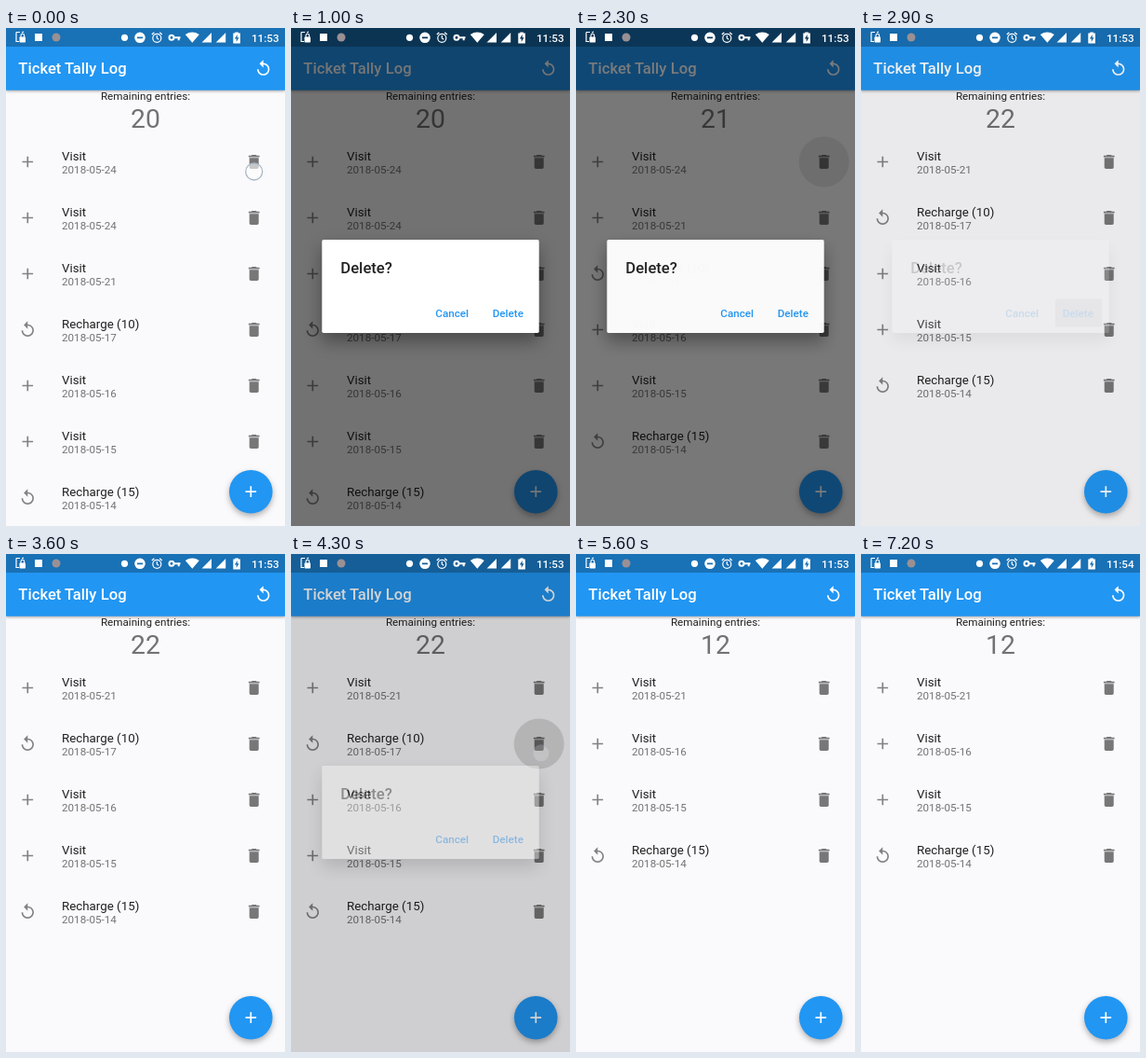
Write an HTML page that moves like this. It is 300 by 534 pixels and loops after 7.7 s.

```html
<!DOCTYPE html>
<html lang="en">
<head>
<meta charset="utf-8">
<title>Ticket Tally Log</title>
<style>
  html, body { margin: 0; width: 100%; height: 100%; overflow: hidden; background: #faf9fb; }
  svg { display: block; width: 300px; height: 534px; font-family: Roboto, sans-serif; }
  .bar { filter: drop-shadow(0 1.5px 1.8px rgba(0,0,0,.35)); }
  .fab { filter: drop-shadow(0 3px 3px rgba(0,0,0,.3)); }
  .card { filter: drop-shadow(0 9px 9px rgba(0,0,0,.35)); }
  .title { font-size: 16.67px; font-weight: 500; }
  .item { font-size: 13.33px; fill: rgba(0,0,0,.87); }
  .small { font-size: 11.67px; }
  .grey { fill: rgba(0,0,0,.54); }
  .button { font-size: 11.67px; font-weight: 500; fill: #2196f3; }
</style>
</head>
<body>
<svg viewBox="0 0 300 534">
  <defs>
    <path id="add" d="M19 13h-6v6h-2v-6H5v-2h6V5h2v6h6v2z"/>
    <path id="replay" d="M12 5V1L7 6l5 5V7c3.31 0 6 2.69 6 6s-2.69 6-6 6-6-2.69-6-6H4c0 4.42 3.58 8 8 8s8-3.58 8-8-3.58-8-8-8z"/>
    <path id="trash" d="M6 19c0 1.1.9 2 2 2h8c1.1 0 2-.9 2-2V7H6v12zM19 4h-3.5l-1-1h-5l-1 1H5v2h14V4z"/>
  </defs>

  <rect width="300" height="534" fill="#faf9fb"/>
  <text x="150" y="77.3" text-anchor="middle" class="small" fill="rgba(0,0,0,.87)">Remaining entries:</text>
  <text id="count" x="150" y="107" text-anchor="middle" font-size="28.33" class="grey"></text>
  <g id="list"></g>
  <circle id="ripple" cx="266.7" fill="#000"/>

  <rect class="bar" y="-5" width="300" height="71.7" fill="#2196f3"/>
  <rect width="300" height="20" fill="#1971b6"/>
  <text x="13.3" y="49.3" class="title" fill="#fff">Ticket Tally Log</text>
  <use href="#replay" transform="translate(266.7 33.3) scale(.8333)" fill="#fff"/>
  <circle class="fab" cx="263.3" cy="497.2" r="23.3" fill="#2196f3"/>
  <use href="#add" transform="translate(253.3 487.2) scale(.8333)" fill="#fff"/>

  <rect id="shade" width="300" height="534"/>
  <g id="dialog">
    <rect class="card" x="33.3" y="227" width="233.4" height="100" rx="1.7" fill="#fff"/>
    <rect id="press" x="209" y="290.5" width="50" height="30" rx="1.7" fill="#999"/>
    <text x="53.3" y="263.2" class="title" fill="rgba(0,0,0,.87)">Delete?</text>
    <text x="155.3" y="309.6" class="button">Cancel</text>
    <text x="216.7" y="309.6" class="button">Delete</text>
  </g>

  <!-- status icons -->
  <g fill="#fff">
    <path d="M11 4.5h4M11 4.5v10h3M17 5l2-1" fill="none" stroke="#fff" stroke-width="1.2"/>
    <rect x="14.5" y="9.5" width="6.5" height="6" rx=".8"/>
    <path d="M16 10V8a1.8 1.8 0 0 1 3.6 0v2" fill="none" stroke="#fff" stroke-width="1.1"/>
    <rect x="31" y="6" width="8" height="8"/>
    <circle cx="54" cy="10" r="4.5" fill="#9a9094"/>
    <circle cx="127.5" cy="10.3" r="3.6"/>
    <path fill-rule="evenodd" d="M138.2 10.3a5.8 5.8 0 1 0 11.6 0a5.8 5.8 0 1 0-11.6 0zM141 9.5h6v1.7h-6z"/>
    <g fill="none" stroke="#fff" stroke-width="1.2">
      <circle cx="162.3" cy="10.8" r="4.5"/>
      <path d="M162.3 8v3l2 1.3M156.8 7l2.6-2.2M167.8 7l-2.6-2.2"/>
      <circle cx="178" cy="10.3" r="2.5" stroke-width="2"/>
      <path d="M180.5 10.3h7M185.7 10.3v3" stroke-width="2"/>
    </g>
    <path d="M200.3 15.8L192.8 6.9Q200.3 2.1 207.8 6.9zM210.5 15.5h10.5V5zM225.7 15.5h10.5V5z"/>
    <path fill-rule="evenodd" d="M244.3 5.6h2V4.4h3.6v1.2h2v10.8h-7.6zM248.7 7l-2.8 4.6h1.8V15l2.8-4.7h-1.8z"/>
    <text id="clock" x="293.6" y="14.6" text-anchor="end" class="small" font-weight="500"></text>
  </g>

  <circle id="touch" r="9" fill="rgba(255,255,255,.6)" stroke="#a9b9c6" stroke-width="1.3"/>
</svg>

<script>
const LOOP = 7700;
const get = id => document.getElementById(id);
const set = (id, attrs) => {
  for (const key in attrs) get(id).setAttribute(key, attrs[key]);
};

// days in May, with the recharge amount and the index of the tap that deletes the entry
const entries = [
  { day: 24, gone: 0 },
  { day: 24, gone: 1 },
  { day: 21 },
  { day: 17, charge: 10, gone: 2 },
  { day: 16 },
  { day: 15 },
  { day: 14, charge: 15 }
];
const taps = [
  { open: 0, close: 1000, x: 266.7, y: 154, row: 0 },
  { open: 2000, close: 2600, x: 271, y: 152, row: 0 },
  { open: 4100, close: 4800, x: 269, y: 214, row: 1 }
];
const counts = [20, 21, 22, 12];
const FADE = 155, OPEN_LAG = 152, CLOSE_LAG = 164;

const icon = (name, x, alpha) =>
  `<use href="#${name}" transform="translate(${x - 10} 133.5) scale(.8333)" fill-opacity="${alpha}"/>`;

get("list").innerHTML = entries.map(({ day, charge }) => `<g>
  ${icon(charge ? "replay" : "add", 23.3, .48)}
  <text x="60" y="141.6" class="item">${charge ? `Recharge (${charge})` : "Visit"}</text>
  <text x="60" y="156" class="small grey">2018-05-${day}</text>
  ${icon("trash", 266.7, .52)}</g>`).join("");
const rows = [...get("list").children];

const ramp = (t, start, length) => Math.min(1, Math.max(0, (t - start) / length));

function draw(t) {
  const deleted = taps.filter(tap => t >= tap.close + CLOSE_LAG).length;
  let line = 0;
  entries.forEach(({ gone }, i) => {
    const shown = gone === undefined || gone >= deleted;
    rows[i].setAttribute("display", shown ? "inline" : "none");
    if (shown) rows[i].setAttribute("transform", `translate(0 ${60 * line++})`);
  });
  get("count").textContent = counts[deleted];
  get("clock").textContent = t < 6300 ? "11:53" : "11:54";

  const tap = taps.filter(tap => t >= tap.open).pop();
  const since = t - tap.open, closing = t - tap.close;
  const fade = Math.min(ramp(since, OPEN_LAG, FADE), 1 - ramp(closing, CLOSE_LAG, FADE));
  set("shade", { opacity: .54 * fade });
  set("dialog", { opacity: fade ** .85 });
  set("press", { opacity: .4 * ramp(closing, 70, 80) });
  set("ripple", {
    cy: 143.5 + 60 * tap.row,
    r: 27 * ramp(since, 100, 90),
    opacity: .13 * (1 - ramp(since, 220, 250))
  });

  const onButton = closing >= 50;
  set("touch", {
    cx: onButton ? 233 : tap.x,
    cy: onButton ? 306 : tap.y,
    opacity: onButton ? .6 * (1 - ramp(closing, 50, 110)) : 1 - ramp(since, 0, 300)
  });
}

const start = performance.now();
function tick() {
  draw((performance.now() - start) % LOOP);
  requestAnimationFrame(tick);
}
tick();
</script>
</body>
</html>
```
